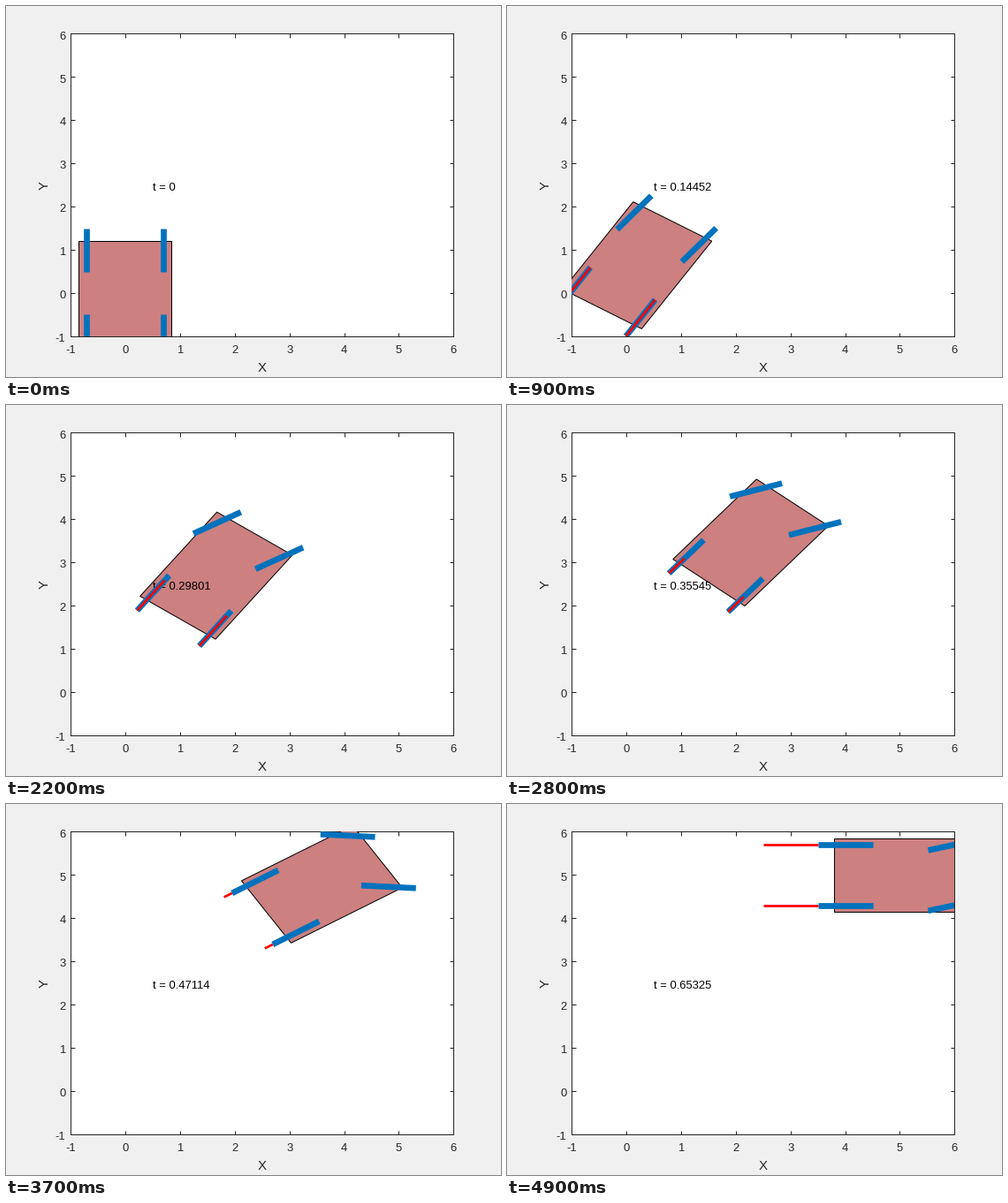
These frames come from a looping animation (560x420 px, 5 s). A matplotlib script:

```python
import numpy as np
import matplotlib.pyplot as plt
from matplotlib.animation import FuncAnimation
from matplotlib.patches import Polygon

W, H, DPI = 560, 420, 100
PX = 72 / DPI
FRAMES, INTERVAL = 50, 100
LEFT, RIGHT, TOP, BOTTOM = 72.9, 506.4, 31.4, 373.9
INK, BLUE, RED = "#262626", "#0072bd", "#ff0000"

plt.rcParams["font.family"] = "Liberation Sans"

# Key poses of the manoeuvre: step, clock, x, y, heading, steering (degrees)
POSES = np.array([
    (0, 0, 0, 0, 90, 0),
    (9, 0.14452, 0.205, 0.642, 57.7, -6.5),
    (15, 0.2248, 0.912, 1.673, 56.1, -30),
    (22, 0.29801, 1.663, 2.694, 54.2, -24.4),
    (28, 0.35545, 2.274, 3.459, 50.5, -32.7),
    (37, 0.47114, 3.593, 4.785, 32.2, -35.8),
    (42, 0.5466, 4.52, 5, 3, -5),
    (49, 0.65325, 5, 5, 0, 15),
])
keys, clock, *pose, steering = POSES.T
steps = np.arange(FRAMES)


def smooth(values, at_rest=True):
    """Cubic curve through the key values, optionally still at both ends."""
    slopes = np.gradient(values, keys)
    if at_rest:
        slopes[[0, -1]] = 0
    i = np.clip(np.searchsorted(keys, steps, side="right") - 1,
                0, len(keys) - 2)
    h = keys[i + 1] - keys[i]
    u = (steps - keys[i]) / h
    return (values[i] * (1 + 2 * u) * (1 - u) ** 2
            + values[i + 1] * u * u * (3 - 2 * u)
            + h * u * (1 - u) * (slopes[i] * (1 - u) - slopes[i + 1] * u))


times = smooth(clock, at_rest=False)
xs, ys, headings = map(smooth, pose)
headings = np.radians(headings)

# The car swerves hard while it sets off, then follows the key angles
swerve = 45 * np.sin(np.pi * np.minimum(steps / keys[1], 1))
steer = np.radians(np.interp(steps, keys, steering) - swerve)

# Thrust builds up, holds, then falls steadily into full braking
thrust = np.minimum(np.minimum(steps / 8, 1), (34.5 - steps) / 14.5)

fig = plt.figure(figsize=(W / DPI, H / DPI), dpi=DPI, facecolor="#f0f0f0")
ax = fig.add_axes([LEFT / W, 1 - BOTTOM / H,
                   (RIGHT - LEFT) / W, (BOTTOM - TOP) / H])
ax.set(xlim=(-1, 6), ylim=(-1, 6), xticks=range(-1, 7), yticks=range(-1, 7))
ax.set_axisbelow(True)
ax.tick_params(direction="in", length=4.5 * PX, width=PX, color=INK,
               top=True, right=True, labelbottom=False, labelleft=False)
for spine in ax.spines.values():
    spine.set(linewidth=PX, color=INK, zorder=0.6)


def label(x, y, text, size=13, **style):
    style = {"color": INK, "ha": "center", "va": "baseline", **style}
    return fig.text(x / W, 1 - y / H, text, fontsize=size * PX, **style)


for n in range(-1, 7):
    part = (n + 1) / 7
    label(LEFT + part * (RIGHT - LEFT), 393, str(n))
    label(67.5, BOTTOM - part * (BOTTOM - TOP) + 6.2, str(n), ha="right")
label(290, 414, "X", 15)
label(44, 203, "Y", 15, rotation=90, va="center")

body = ax.add_patch(Polygon(np.zeros((4, 2)), facecolor="#cc8080",
                            edgecolor="black", linewidth=PX, zorder=1))
readout = label(166, 209, "", color="black", ha="left")
readout.remove()
readout = ax.text((166 - LEFT) / (RIGHT - LEFT),
                  (BOTTOM - 209) / (BOTTOM - TOP), "",
                  transform=ax.transAxes, fontsize=13 * PX,
                  color="black", va="baseline", zorder=2)


def bar(color, width, zorder):
    return ax.plot([], [], color=color, linewidth=width * PX,
                   solid_capstyle="butt", zorder=zorder)[0]


HUBS = np.array([(1, 0.7), (1, -0.7), (-1, 0.7), (-1, -0.7)])
CORNERS = np.array([(1.2, 0.85), (1.2, -0.85), (-1.2, -0.85), (-1.2, 0.85)])
wheels = [bar(BLUE, 6.7, 3) for _ in HUBS]
arrows = [bar(RED, 2.7, 4) for _ in HUBS[2:]]


def direction(angle):
    return np.array([np.cos(angle), np.sin(angle)])


def draw(i):
    centre = np.array([xs[i], ys[i]])
    ahead = direction(headings[i])
    axes = np.array([ahead, (-ahead[1], ahead[0])])
    hubs = centre + HUBS @ axes
    body.set_xy(centre + CORNERS @ axes)
    for k, (hub, wheel) in enumerate(zip(hubs, wheels)):
        half = 0.5 * direction(headings[i] + (steer[i] if k < 2 else 0))
        wheel.set_data(*zip(hub - half, hub + half))
    for hub, arrow in zip(hubs[2:], arrows):
        tail = hub - 0.5 * ahead
        arrow.set_data(*zip(tail, tail + thrust[i] * ahead))
    readout.set_text(f"t = {times[i]:.5g}")
    return [body, readout, *wheels, *arrows]


animation = FuncAnimation(fig, draw, frames=FRAMES, interval=INTERVAL,
                          repeat=True, repeat_delay=0)
plt.show()
```
